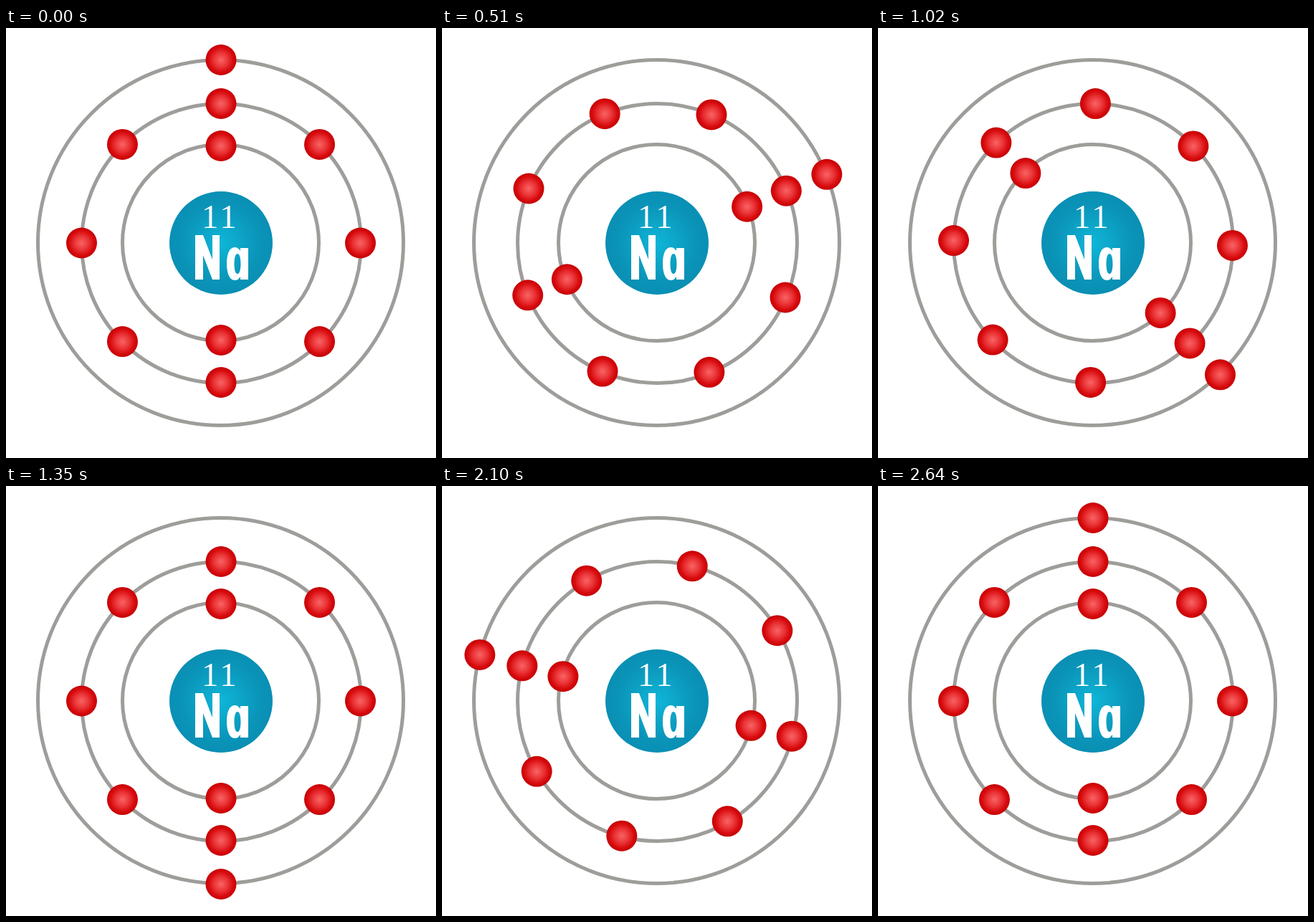
Animation of 600 by 600 pixels, one loop 2.67 s. Source, as an HTML page:

```html
<!DOCTYPE html>
<html lang="en">
<head>
<meta charset="utf-8">
<title>Sodium electron shells</title>
<style>
  html, body { margin: 0; width: 100%; height: 100%; overflow: hidden; background: #fff; }
  svg { display: block; width: 100%; height: 100%; }
  text { font: 47px "Liberation Serif", "Times New Roman", serif; letter-spacing: 3.5px; }
</style>
</head>
<body>
<svg viewBox="0 0 600 600">
  <defs>
    <radialGradient id="red">
      <stop offset="0" stop-color="#f96464"/>
      <stop offset=".45" stop-color="#ea3538"/>
      <stop offset=".8" stop-color="#d70a0d"/>
      <stop offset="1" stop-color="#c40306"/>
    </radialGradient>
    <radialGradient id="blue">
      <stop offset="0" stop-color="#0fb6d8"/>
      <stop offset=".75" stop-color="#0a94b8"/>
      <stop offset="1" stop-color="#0a8fb4"/>
    </radialGradient>
  </defs>
  <g fill="none" stroke="#9e9d9a" stroke-width="5">
    <circle cx="299.5" cy="299.5" r="255"/>
    <circle cx="300.5" cy="300.5" r="195"/>
    <circle cx="299.5" cy="299.5" r="137"/>
  </g>
  <circle cx="300" cy="300" r="72" fill="url(#blue)"/>
  <g fill="#fff">
    <text x="273" y="279">11</text>
    <!-- condensed "Na" lettering -->
    <path d="M264 351V289H275L288 323V289H298V351H288L275 317V351Z"/>
    <path fill-rule="evenodd" d="M327 307H338V351H327V347C325 350 323 352 319 352C312 352 308 342 308 329C308 315 312 306 319 306C323 306 325 308 327 311ZM323 315C320 315 318.500 321 318.500 329C318.500 337 320 343 323 343C326 343 327.500 337 327.500 329C327.500 321 326 315 323 315Z"/>
  </g>
  <g id="electrons" fill="url(#red)"></g>
</svg>
<script>
const STEP = 30, FRAMES = 89, HALF = 45, LAST = 88;
const shells = [[1, 255.5], [8, 194.5], [2, 135.5]];
const layer = document.getElementById("electrons");
const electrons = shells.flatMap(([count, radius]) =>
  Array.from({ length: count }, (_, i) => {
    const dot = document.createElementNS(layer.namespaceURI, "circle");
    dot.setAttribute("r", 21.5);
    layer.append(dot);
    return { dot, radius, phase: i / count };
  }));

// Two half turns, the second slightly faster.
function turnAt(ms) {
  const step = Math.floor(ms / STEP) % FRAMES;
  return step < HALF ? step / HALF / 2 : 0.5 + (step - HALF) / (LAST - HALF) / 2;
}

function draw() {
  const turn = turnAt(performance.now());
  for (const { dot, radius, phase } of electrons) {
    const angle = (turn + phase) * 2 * Math.PI;
    dot.setAttribute("cx", 300 + radius * Math.sin(angle));
    dot.setAttribute("cy", 300 - radius * Math.cos(angle));
  }
  requestAnimationFrame(draw);
}
draw();
</script>
</body>
</html>
```
